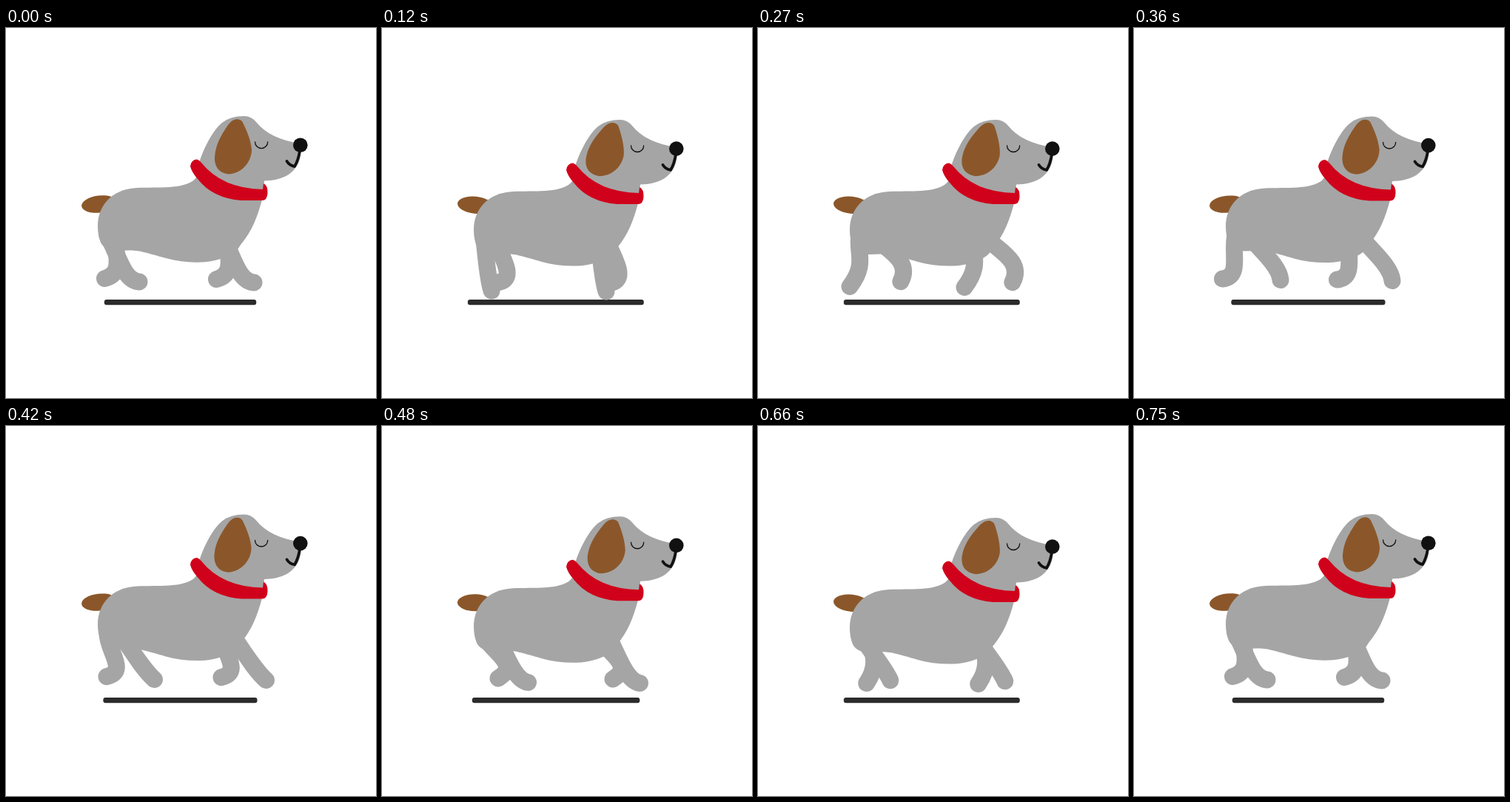
Recreate the animation shown at these times as an HTML page. Size 500 by 500 pixels, loop 0.78 s.

```html
<!DOCTYPE html>
<html lang="en">
<head>
<meta charset="utf-8">
<title>Walking dog</title>
<style>
  html, body { margin: 0; width: 100%; height: 100%; overflow: hidden; background: #fff; }
  svg { display: block; width: 100%; height: 100%; }
  .coat { fill: #a5a5a5; }
  .brown { fill: #8b572a; }
  .leg { fill: none; stroke: #a5a5a5; stroke-width: 23; stroke-linecap: round; }
  .ink { fill: none; stroke: #111; stroke-linecap: round; stroke-linejoin: round; }
</style>
</head>
<body>
<svg viewBox="0 0 500 500">
  <rect id="ground" y="367" height="7.2" rx="3" fill="#2b2b2b"/>
  <g class="bob">
    <g id="tail"><ellipse class="brown" cx="126" cy="238" rx="24" ry="11.5" transform="rotate(-7 126 238)"/></g>
  </g>
  <g id="legs"></g>
  <g class="bob">
    <path class="coat" d="M124 268C124 238 145 219 172 216.500C200 214 233 219 252 207Q262 200 261 182
      C268 160 280 138 292 128Q303 119 322 119Q331 119 338 127C351 143 371 152 397 156
      Q401 169 395 183C387 198 373 206 349 206.500L346 232C340 254 333 274 317 293
      Q312 303 300 308C278 319 246 319 216 311C190 304 180 300 166 300.500L150 301
      Q134 301 128 290Q124 280 124 268Z"/>
    <path id="ear" class="brown" d="M314 123.500C304 122 299 133 293 142C284 157 282 168 282 178C283 191 291 197 302 197.500
      C319 196 332 181 332 164C331 152 325 138 321 130Q319 124 314 123.500Z"/>
    <path fill="#d0021b" d="M249 187Q250 178 258 177.500Q261 178 264 182Q292 217 347 218L348 210
      Q354 213 353.500 223Q353 233 346 233L318 233Q279 230 259 204Q251 195 249 187Z"/>
    <path class="ink" stroke-width="1.3" d="M336.500 154A8.600 8.600 0 0 0 353.700 154"/>
    <path class="ink" stroke-width="3.8" d="M397 166Q395 179 390 187Q383 186 379.500 180"/>
    <circle cx="397.800" cy="158.200" r="9.800" fill="#111"/>
  </g>
</svg>
<script>
const STEP = 30, STEPS = 26, CYCLE = 25;
const $ = id => document.getElementById(id);
const rad = Math.PI / 180;

// Foot keys: time, x, y, ankle angle from upright. Each hind leg has a front twin.
const gaits = [
  { hip: [137, 280], twin: 155, keys: [
    [0, 180, 343, -87], [4, 148, 355, -17], [7, 132.5, 356, 3],
    [12, 119.5, 339, 83], [16, 157, 341, 58], [19, 170.5, 345.5, 52]] },
  { hip: [148, 272], twin: 151, keys: [
    [0, 133.5, 338.5, 75], [4, 158, 343.5, 78], [7, 185.5, 344.5, 47],
    [12, 198, 340.5, -5], [16, 197.5, 346.5, -81], [19, 169, 356, -18]] }
];

function addLeg(dx, dy) {
  const path = document.createElementNS('http://www.w3.org/2000/svg', 'path');
  path.setAttribute('class', 'leg');
  path.setAttribute('transform', `translate(${dx} ${dy})`);
  $('legs').append(path);
  return path;
}
for (const gait of gaits) gait.paths = [addLeg(0, 0), addLeg(gait.twin, 1)];

// Smooth periodic curve through the keys.
function footAt(keys, t) {
  const n = keys.length;
  const key = j => {
    const [time, ...pose] = keys[(j + n) % n];
    return { time: time + CYCLE * Math.floor(j / n), pose };
  };
  const i = keys.findLastIndex(k => k[0] <= t);
  const [p, a, b, q] = [-1, 0, 1, 2].map(d => key(i + d));
  const span = b.time - a.time, u = (t - a.time) / span;
  return a.pose.map((from, k) => {
    const to = b.pose[k];
    const m = (to - p.pose[k]) / (b.time - p.time) * span;
    const w = (q.pose[k] - from) / (q.time - a.time) * span;
    return from + u * (m + u * (3 * (to - from) - 2 * m - w + u * (2 * (from - to) + m + w)));
  });
}

// The thigh leans towards the foot; the shin reaches further when the knee is bent back.
function legShape({ hip: [hx, hy], keys }, t) {
  const [x, y, angle] = footAt(keys, t);
  const shin = 22 + 18 * Math.max(0, Math.sin(2 * angle * rad));
  const thigh = [hx + (x - hx) / 3, hy + 24];
  const ankle = [x + shin * Math.sin(angle * rad), y - shin * Math.cos(angle * rad)];
  return `M${hx} ${hy}C${thigh} ${ankle} ${x} ${y}`;
}

function draw(t) {
  const dip = Math.sin(Math.PI * t / 13) ** 2;
  for (const g of document.querySelectorAll('.bob')) g.setAttribute('transform', `translate(0 ${7.2 * dip})`);
  $('ear').setAttribute('transform', `rotate(${11.5 * dip} 314 127)`);
  $('tail').setAttribute('transform', `rotate(${18 * dip} 143 236)`);
  $('ground').setAttribute('x', 132.8 - 25 * dip);
  $('ground').setAttribute('width', 205.4 + 48 * dip);
  for (const gait of gaits) {
    const shape = legShape(gait, t);
    for (const path of gait.paths) path.setAttribute('d', shape);
  }
}

const start = performance.now();
function tick() {
  const step = Math.floor((performance.now() - start) / STEP) % STEPS;
  draw(step % CYCLE);
  requestAnimationFrame(tick);
}
tick();
</script>
</body>
</html>
```
